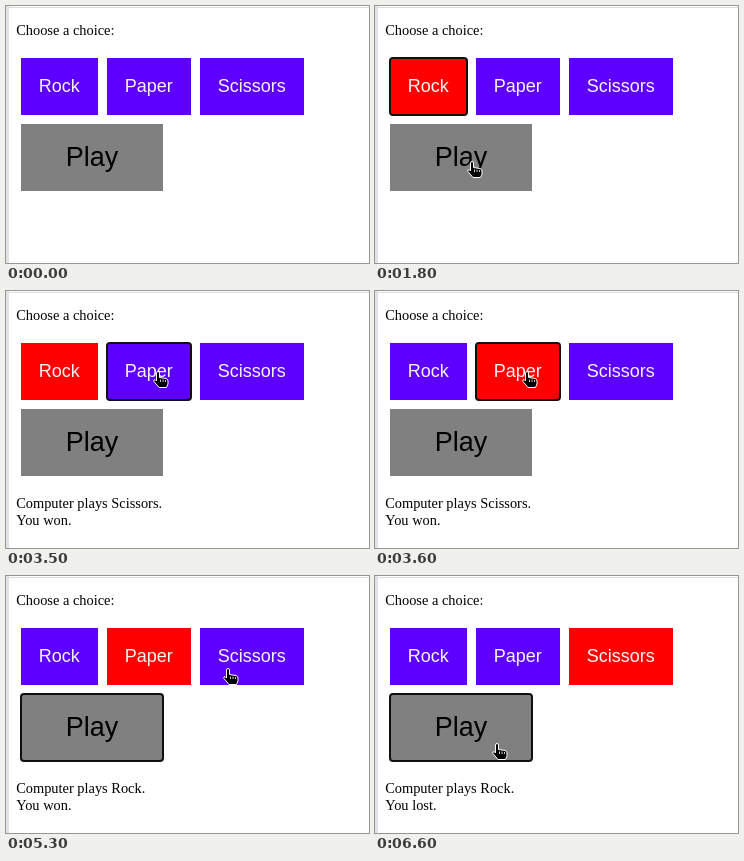
Recreate the animation shown at these times as an HTML page. Size 363 by 257 pixels, loop 8.8 s.

```html
<!DOCTYPE html>
<html lang="en">
<head>
<meta charset="utf-8">
<title>Rock, Paper, Scissors</title>
<style>
  html, body { margin: 0; width: 100%; height: 100%; overflow: hidden; }
  body {
    position: relative;
    font: 14.4px/17px "Liberation Serif", serif;
    color: #000;
    background:
      linear-gradient(#dfe3e8, #dfe3e8) 0 0 / 3px 100% no-repeat,
      linear-gradient(#dcdcdc, #dcdcdc) 0 1px / 100% 1px no-repeat,
      #fff;
  }
  p, #buttons { position: absolute; left: 10.2px; margin: 0; white-space: pre; }
  #prompt { top: 16px; }
  #buttons { top: 47.5px; width: 300px; display: flex; flex-wrap: wrap; }
  #result { top: 204px; }
  #buttons div {
    margin: 4.5px;
    padding: 18px;
    font: 18px/21px "Liberation Sans", sans-serif;
    color: #f5f5f5;
    background: #5e00ff;
  }
  #buttons .chosen { background: #f00; }
  #buttons .play { padding: 18px 45px; font-size: 27px; line-height: 31px; color: #000; background: #808080; }
  #buttons .focused { outline: 2px solid #101010; outline-offset: -1px; border-radius: 3px; }
  #hand { position: absolute; left: 0; top: 0; overflow: visible; }
</style>
</head>
<body>
<p id="prompt">Choose a choice:</p>
<div id="buttons">
  <div>Rock</div>
  <div>Paper</div>
  <div>Scissors</div>
  <div class="play">Play</div>
</div>
<p id="result"></p>
<svg id="hand" width="16" height="18" stroke="#fff" stroke-linejoin="round">
  <path d="M3.5 9V2Q3.5 .5 5 .5T6.5 2V6.5L13 7.5Q15 8 15 10V13L13.5 16.5H6L1 10.5Q.3 8.5 2 8.5L3.5 10Z"/>
  <path d="M7.5 8.5V11M10 8.5V11M12.5 9V11" stroke-width=".8"/>
</svg>
<script>
const LOOP = 8800, TICK = 100;
const buttons = [...document.querySelectorAll('#buttons div')];
const result = document.getElementById('result');
const hand = document.getElementById('hand');

// Each event updates part of the page state
const events = [
  { at: 0, focus: '', chosen: '', move: '', outcome: '' },
  { at: 1500, focus: 'Rock' },
  { at: 1600, chosen: 'Rock' },
  { at: 2000, focus: 'Play' },
  { at: 2200, move: 'Scissors', outcome: 'won' },
  { at: 3500, focus: 'Paper' },
  { at: 3600, chosen: 'Paper' },
  { at: 4400, focus: 'Play', move: 'Rock' },
  { at: 5600, focus: 'Scissors' },
  { at: 5800, chosen: 'Scissors' },
  { at: 6500, focus: 'Play' },
  { at: 6600, outcome: 'lost' }
];

// The pointer enters here, then glides from one resting place to the next
const entry = { x: 50, y: 51 };
const glides = [
  { from: 700, to: 900, x: 66, y: 80 },
  { from: 1200, to: 1300, x: 65, y: 82 },
  { from: 1500, to: 1800, x: 92, y: 155 },
  { from: 2830, to: 3200, x: 147, y: 80 },
  { from: 3700, to: 4000, x: 102, y: 150 },
  { from: 5000, to: 5500, x: 239, y: 81 },
  { from: 6000, to: 6300, x: 117, y: 167 }
];

const easeOut = k => 1 - (1 - k) ** 2;

function pointerAt(time) {
  let { x, y } = entry;
  for (const glide of glides) {
    const progress = (time - glide.from) / (glide.to - glide.from);
    const k = easeOut(Math.min(1, Math.max(0, progress)));
    x += (glide.x - x) * k;
    y += (glide.y - y) * k;
  }
  return { x: Math.round(x), y: Math.round(y) };
}

function draw(time) {
  const state = Object.assign({}, ...events.filter(event => event.at <= time));
  for (const button of buttons) {
    const label = button.textContent;
    button.classList.toggle('focused', label === state.focus);
    button.classList.toggle('chosen', label === state.chosen);
  }
  result.textContent = state.move && `Computer plays ${state.move}.\nYou ${state.outcome}.`;

  const { x, y } = pointerAt(time);
  hand.style.visibility = time < glides[0].from ? 'hidden' : 'visible';
  hand.style.transform = `translate(${x}px, ${y}px)`;
}

const start = performance.now();
function frame() {
  const time = (performance.now() - start) % LOOP;
  draw(Math.floor(time / TICK) * TICK);
  requestAnimationFrame(frame);
}
frame();
</script>
</body>
</html>
```
